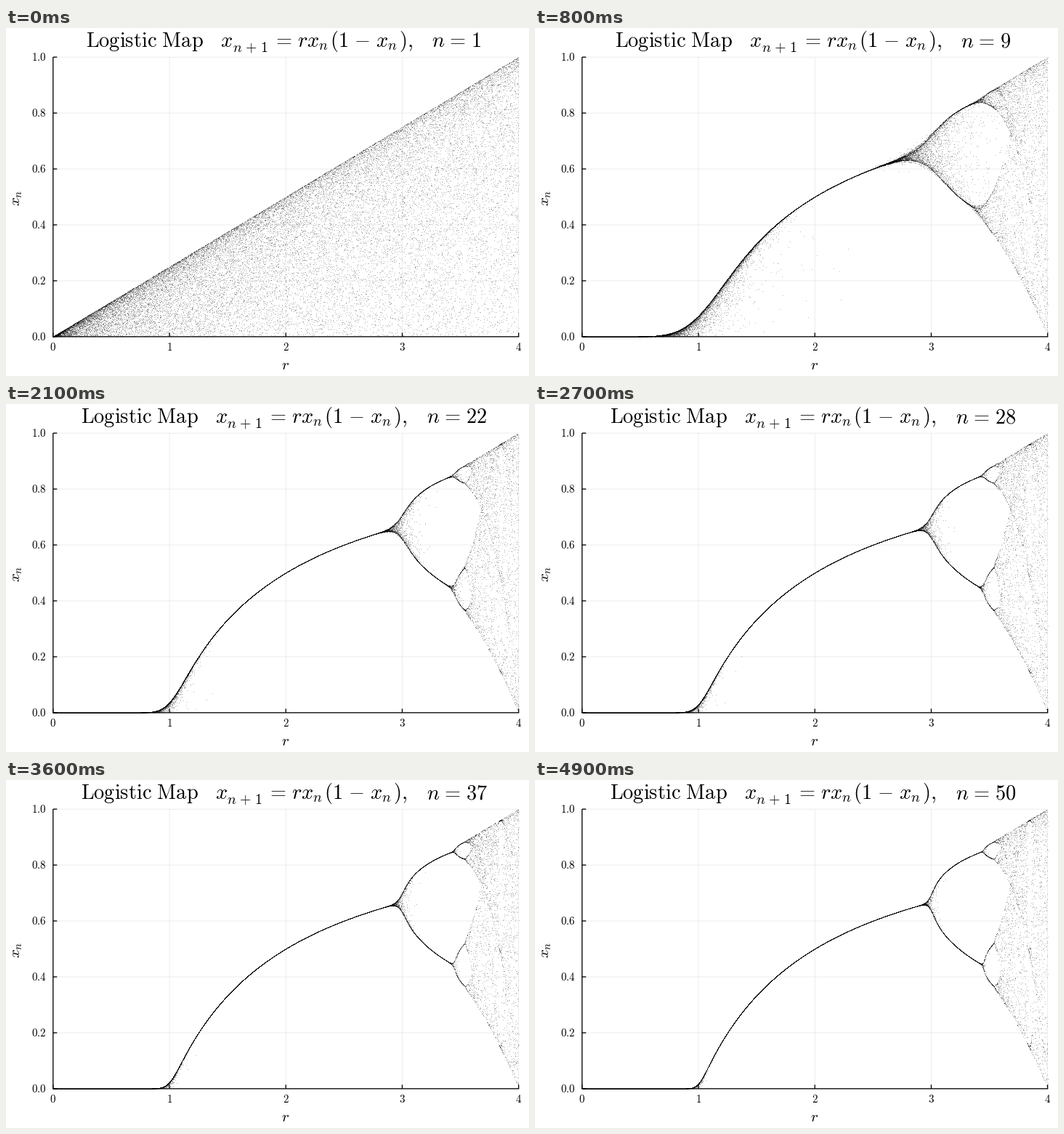
Write a matplotlib script that moves like this. It is 720x479 px and loops after 5 s.

```python
import numpy as np
import matplotlib.pyplot as plt
from matplotlib.animation import FuncAnimation

W, H, DPI = 720, 479, 64
PT = 72 / DPI  # points per pixel
LEFT, RIGHT, TOP, BOTTOM = 64.8, 705.7, 40.1, 424.9
STEPS, COUNT = 50, 25000
TITLE, GUIDE, TICK = 28.4, 21, 15

plt.rcParams["mathtext.fontset"] = "cm"

fig = plt.figure(figsize=(W / DPI, H / DPI), dpi=DPI, facecolor="white")
ax = fig.add_axes([0, 0, 1, 1])
ax.set_xlim(0, W)
ax.set_ylim(H, 0)
ax.axis("off")


def px(r):
    return LEFT + (RIGHT - LEFT) * r / 4


def py(x):
    return BOTTOM + (TOP - BOTTOM) * x


def line(xs, ys, width, **style):
    ax.plot(xs, ys, color="black", lw=width * PT, solid_capstyle="butt",
            snap=False, **style)


def label(x, y, tex, size, ha="left", **style):
    return ax.text(x, y, f"${tex}$", fontsize=size * PT, ha=ha,
                   va="baseline", color="black", **style)


# Grid, inward ticks and tick labels
for r in range(5):
    x = px(r)
    line([x, x], [TOP, BOTTOM], 0.7, alpha=0.1, zorder=1)
    line([x, x], [BOTTOM, BOTTOM - 5.5], 1.3, zorder=4)
    label(x, 443.6, str(r), TICK, "center")
for k in range(6):
    y = py(k / 5)
    line([LEFT, RIGHT], [y, y], 0.7, alpha=0.1, zorder=1)
    line([LEFT, LEFT + 5.5], [y, y], 1.3, zorder=4)
    label(55.5, y + 5, f"{k / 5:.1f}", TICK, "right")

line([LEFT, LEFT], [TOP, BOTTOM + 0.6], 1.3, zorder=4)
line([LEFT - 0.6, RIGHT + 0.6], [BOTTOM, BOTTOM], 1.3, zorder=4)
label(385, 470.5, "r", GUIDE, "center")
label(19, 233.5, "x_n", GUIDE, "center", rotation=90, rotation_mode="anchor")

# Title pieces, moved together to stay centred as the counter widens
GAP = r"\hspace{0.11}"
EQ = GAP + "=" + GAP
XN = r"x_n\hspace{0.1}"
pieces = [
    (110, 26, r"\mathrm{Logistic\ Map}", TITLE),
    (295, 26, "x", TITLE),
    (311.5, 33, f"n{GAP}+{GAP}1", TITLE * 0.7),
    (363.5, 26, f"{EQ}r{XN}(1{GAP}-{GAP}{XN}),", TITLE),
    (586.4, 26, f"n{EQ}1", TITLE),
]
title = [label(*piece) for piece in pieces]
counter = title[-1]

# Every orbit starts at a random value; r sweeps the axis evenly
rates = np.linspace(0, 4, COUNT)
state = np.random.default_rng(7).random(COUNT)
orbit = []
for _ in range(STEPS):
    state = rates * state * (1 - state)
    orbit.append(state)

dots, = ax.plot([], [], ",", color="black", alpha=0.27, zorder=3)
DROP = 0.7  # offsets the marker's upward rounding to whole pixels


def draw(i):
    n = i + 1
    dots.set_data(px(rates), py(orbit[i]) + DROP)
    counter.set_text(f"$n{EQ}{n}$")
    shift = 0 if n < 10 else -5 if n < 20 else -7
    for text, piece in zip(title, pieces):
        text.set_x(piece[0] + shift)
    return [dots, *title]


anim = FuncAnimation(fig, draw, frames=STEPS, init_func=lambda: draw(0),
                     interval=100, repeat=True, repeat_delay=0, blit=False)
plt.show()
```
